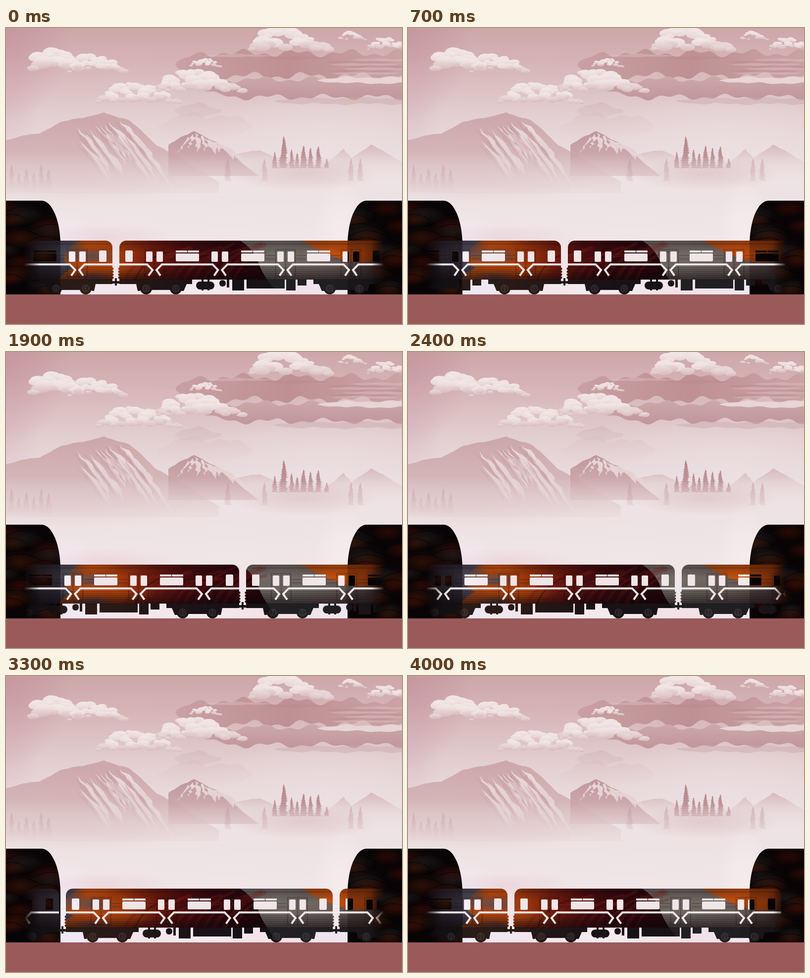
An HTML page with a canvas for the animation above (4.1 s loop, 800x600 px).

```html
<!DOCTYPE html>
<html lang="en">
<head>
<meta charset="utf-8">
<title>Train between tunnels</title>
<style>
  html, body { margin: 0; width: 800px; height: 600px; overflow: hidden; background: #9a5a59; }
  canvas { display: block; }
</style>
</head>
<body>
<canvas id="stage" width="800" height="600"></canvas>
<script>
const W = 800, H = 600, GROUND = 540;
const STEP_MS = 100, STEPS = 41, SPEED = 13.487;
const CAR = 539, PITCH = 553, START = 229, PAD = 20;
const doorAt = i => 71 + i * 132.3;

function layer(w, draw) {
  const cv = document.createElement('canvas');
  cv.width = w;
  cv.height = H;
  const c = cv.getContext('2d');
  if (draw) draw(c);
  return cv;
}

function ramp(c, x0, y0, x1, y1, ...colors) {
  const g = c.createLinearGradient(x0, y0, x1, y1);
  colors.forEach((col, i) => g.addColorStop(i / (colors.length - 1), col));
  return g;
}
const down = (c, y0, y1, ...colors) => ramp(c, 0, y0, 0, y1, ...colors);

function shape(c, paint, d) {
  c.fillStyle = paint;
  c.fill(new Path2D(d));
}

function line(c, paint, width, d) {
  c.strokeStyle = paint;
  c.lineWidth = width;
  c.stroke(new Path2D(d));
}

function oval(c, paint, x, y, rx, ry = rx) {
  c.fillStyle = paint;
  c.beginPath();
  c.ellipse(x, y, rx, ry, 0, 0, 7);
  c.fill();
}

function glow(c, x, y, rx, ry, rgb, alpha) {
  c.save();
  c.translate(x, y);
  c.scale(rx, ry);
  const g = c.createRadialGradient(0, 0, 0, 0, 0, 1);
  [1, .55, 0].forEach((k, i) => g.addColorStop(i / 2, `rgba(${rgb},${alpha * k})`));
  c.fillStyle = g;
  c.fillRect(-1, -1, 2, 2);
  c.restore();
}

function random(seed) {
  return () => (seed = (seed * 16807) % 2147483647) / 2147483647;
}

// Sky

function cumulus(c, x0, x1, base, height) {
  const rnd = random(x0 * 97 + base), w = x1 - x0, lobes = [];
  for (let i = 0, n = w / 4; i < n; i++) {
    const u = (i + rnd()) / n, env = Math.sin(Math.PI * u ** .75);
    const r = height * (.07 + .11 * rnd()) * (.6 + .4 * env);
    lobes.push({ x: x0 + 8 + u * (w - 16), y: base - r - (height - 2 * r) * env * rnd() ** .7, r });
  }
  lobes.sort((a, b) => a.y - b.y).forEach(({ x, y, r }) => {
    const lit = (base - y) / height > .3;
    oval(c, down(c, y - r, y + r * 1.6, lit ? '#f3e8e8' : '#eadbdb', lit ? '#e3cdce' : '#d3b0b2'), x, y, r * 1.9, r);
  });
}

// A long flat cloud with uneven edges and tapered ends.
function bank(c, paint, x0, x1, mid, half) {
  const edge = (x, phase) => {
    const taper = Math.min(1, (x - x0) / 60, (x1 - x) / 60) ** .6;
    return half * taper * (1 + .22 * Math.sin(x / 17 + phase) + .16 * Math.sin(x / 7 + phase * 3));
  };
  const top = [], bottom = [];
  for (let x = x0; x <= x1; x += 3) {
    top.push(`${x} ${mid - edge(x, mid)}`);
    bottom.unshift(`${x} ${mid + edge(x, mid + 2)}`);
  }
  shape(c, paint, `M${top.join(' ')} ${bottom.join(' ')}Z`);
}

function sky(c) {
  c.fillStyle = down(c, 0, 430, '#cda6a8', '#d8b8ba', '#e2ced0', '#eadddf', '#eee3e4', '#f0e5e7');
  c.fillRect(0, 0, W, GROUND);
  glow(c, 0, 30, 130, 160, '182,122,136', .35);
  glow(c, 0, 160, 70, 100, '208,164,182', .3);
  glow(c, 640, 235, 260, 110, '238,226,228', .6);

  const haze = down(c, 150, 225, 'rgba(210,178,180,.5)', 'rgba(222,198,200,0)');
  bank(c, haze, 306, 500, 200, 24);
  bank(c, haze, 340, 436, 168, 17);
  bank(c, ramp(c, 340, 0, 800, 0, '#c9a0a3', '#be9093', '#cba3a5'), 342, 860, 74, 23);
  bank(c, down(c, 98, 146, '#cda8a9', '#c0969a'), 395, 860, 122, 18);
  bank(c, 'rgba(206,174,176,.5)', 540, 860, 148, 6);
  const rnd = random(41);
  for (let i = 0; i < 9; i++) {
    const x = 400 + 300 * rnd();
    bank(c, i % 2 ? 'rgba(178,130,135,.3)' : 'rgba(222,196,196,.4)', x, x + 140, 56 + i * 4.5, 3);
  }
  bank(c, '#e8d5d5', 628, 860, 106, 6);
  [[45, 160, 88, 60], [120, 247, 92, 44], [178, 360, 154, 48], [300, 486, 132, 52], [365, 445, 80, 22],
    [487, 662, 50, 58], [664, 734, 25, 21], [722, 830, 45, 28]].forEach(box => cumulus(c, ...box));
}

// Mountains

// Straight key points broken up by midpoint displacement.
function ridge(c, paint, pts, floor) {
  const rnd = random(pts[0][1] * 53 + floor);
  for (let amount = 6; amount > 1; amount /= 2) {
    pts = pts.flatMap((p, i) => {
      const q = pts[i + 1];
      return q ? [p, [(p[0] + q[0]) / 2, (p[1] + q[1]) / 2 + (rnd() - .5) * amount]] : [p];
    });
  }
  shape(c, paint, `M${pts.join(' ')} V${floor}H${pts[0][0]}Z`);
}

function gully(c, paint, x, y, len, lean, width, rnd) {
  const near = [], far = [];
  for (let i = 0; i <= 8; i++) {
    const px = x + lean * len * i / 8 + (rnd() - .5) * 6, py = y + len * i / 8;
    const w = width * Math.sin(Math.PI * i / 8) * (.5 + rnd());
    near.push(`${px} ${py}`);
    far.unshift(`${px + w} ${py - w * .4}`);
  }
  shape(c, paint, `M${near.join(' ')} ${far.join(' ')}Z`);
}

function tree(c, paint, x, top, bottom, half) {
  const rnd = random(x * 31 + top), rows = Math.round((bottom - top) / 5);
  const left = [], right = [];
  for (let i = 1; i <= rows; i++) {
    const y = top + (bottom - top) * i / rows;
    const w = half * Math.min(1, .2 + 1.1 * i / rows);
    const l = w * (.6 + .6 * rnd()), r = w * (.6 + .6 * rnd());
    left.unshift(`${x - l * .55} ${y} ${x - l} ${y + 1}`);
    right.push(`${x + r} ${y + 1} ${x + r * .55} ${y}`);
  }
  shape(c, paint, `M${x} ${top} L${right.join(' ')} ${left.join(' ')}Z`);
}

function mountains(c) {
  const rnd = random(7);
  ridge(c, down(c, 235, 310, 'rgba(206,172,175,.75)', 'rgba(232,216,218,0)'),
    [[440, 262], [514, 248], [590, 284], [640, 280], [682, 245], [698, 264], [738, 236], [800, 272]], 320);
  ridge(c, down(c, 170, 330, '#cca6a8', 'rgba(216,188,190,.8)'),
    [[0, 227], [68, 214], [112, 190], [198, 171], [250, 188], [304, 238], [352, 262], [430, 312]], 335);

  const snow = down(c, 175, 320, '#ecdcdd', '#e4d1d3', 'rgba(236,224,226,.3)');
  const shade = down(c, 175, 320, 'rgba(190,146,150,.5)', 'rgba(205,170,174,.1)');
  for (let i = 0; i < 16; i++) {
    const x = 142 + i * 8, y = 176 + Math.abs(x - 205) * .4 + 34 * rnd();
    const len = 50 + 60 * rnd();
    gully(c, shade, x - 9, y, len, .72, 7, rnd);
    gully(c, snow, x, y, len, .72, 8, rnd);
  }

  ridge(c, down(c, 208, 300, '#c0969a', 'rgba(206,172,175,.8)'),
    [[328, 237], [380, 209], [440, 240], [510, 300]], 300);
  for (let i = 0; i < 8; i++) {
    const x = 366 + i * 9;
    gully(c, snow, x, 212 + Math.abs(x - 382) * .5, 26 + 18 * rnd(), (i - 2) * .28, 8, rnd);
  }

  // mist over the feet of the slopes
  c.fillStyle = down(c, 255, 350, 'rgba(238,227,229,0)', 'rgba(238,227,229,.5)', '#eee3e4');
  c.fillRect(0, 255, W, 96);
  glow(c, 130, 312, 260, 50, '214,184,190', .3);
  glow(c, 600, 296, 150, 36, '210,176,180', .45);

  const pine = down(c, 220, 300, '#b3868a', '#bd9397', 'rgba(206,174,178,.25)');
  [[561, 219], [543, 250], [577, 245], [588, 253], [601, 238], [615, 242], [631, 239], [648, 264]]
    .forEach(([x, top]) => tree(c, pine, x, top, 284, 5 + (284 - top) / 14));
  const pale = down(c, 262, 335, 'rgba(190,148,154,.5)', 'rgba(200,164,170,.35)', 'rgba(214,186,190,0)');
  for (let x = 11; x < 90; x += 15) tree(c, pale, x, 274 + 26 * rnd(), 334, 9);
  [448, 522, 697, 716].forEach(x => tree(c, pale, x, 264, 310, 8));
}

function tunnels(c) {
  glow(c, 120, 470, 70, 100, '246,240,252', .8);
  glow(c, 190, 425, 150, 28, '228,190,202', .35);
  glow(c, 680, 420, 60, 110, '248,238,240', .7);
  c.fillStyle = ramp(c, 100, 0, 700, 0, '#eceaf6', '#f3e5ea', '#f4eaee', '#f3e1e6', '#eee6f2');
  c.fillRect(100, 508, 600, 32);

  const rnd = random(19), tints = ['74,14,6', '40,36,36', '78,26,6'];
  const mouth = () => {
    c.save();
    c.clip(new Path2D(`M0 350H72A38 91 0 0 1 110 440V${GROUND}H0Z`));
    c.fillStyle = '#080405';
    c.fillRect(0, 340, 120, 200);
    for (let i = 0; i < 15; i++) {
      const x = 100 * rnd(), y = 365 + 12 * i, r = 14 + 10 * rnd();
      glow(c, x, y, r * 2, r, tints[i % 3], .5);
      line(c, 'rgba(0,0,0,.45)', 2, `M${x - r * 2} ${y}q${r * 2} ${-r * 1.4} ${r * 4} 0`);
    }
    c.restore();
  };
  mouth();
  c.save();
  c.translate(W, 0);
  c.scale(-1, 1);
  mouth();
  c.restore();
  c.fillStyle = '#9a5a59';
  c.fillRect(0, GROUND, W, H - GROUND);
}

// Train

// Colours that stay in place while the cars pass through them.
function paintwork(c) {
  c.fillStyle = ramp(c, 40, 0, 760, 0, '#352e38', '#4b4855', '#5a5558', '#635c58', '#69625d', '#716a65', '#6a5c57', '#4c3f3e');
  c.fillRect(0, 420, W, 120);
  shape(c, ramp(c, 100, 0, 550, 0, '#9c4c1c', '#b8480e', '#a23a0c', '#701c0e', '#480c0e', '#32080d', '#28060b', '#1c0508'),
    'M92 540 Q104 500 136 486 Q108 474 122 452 Q134 436 160 428 H468 Q500 446 510 476 Q520 506 552 540Z');
  glow(c, 120, 446, 46, 34, '78,74,88', .9);
  glow(c, 176, 462, 52, 17, '80,76,88', .9);
  glow(c, 176, 505, 46, 12, '72,68,78', .8);
  glow(c, 180, 437, 54, 11, '208,88,18', .8);
  glow(c, 230, 490, 74, 16, '206,84,18', .6);
  const rnd = random(5);
  for (let x = 240; x < 480; x += 20) {
    const rgb = rnd() < .5 ? '128,28,24' : '14,2,5';
    line(c, `rgba(${rgb},.3)`, 3 + 6 * rnd(), `M${x} 512 q20 -50 ${60 + 40 * rnd()} ${-40 - 44 * rnd()}`);
  }
  shape(c, ramp(c, 600, 431, 700, 500, '#a8501c', '#c24f0e', '#a8420c'),
    'M590 428 H770 V464 Q736 478 698 474 Q646 462 590 428Z');
  glow(c, 610, 462, 50, 18, '116,106,100', .6);
  glow(c, 770, 470, 50, 60, '60,16,12', .8);
  c.fillStyle = down(c, 430, 512, 'rgba(10,4,8,.3)', 'rgba(10,4,8,0)', 'rgba(10,4,8,.05)', 'rgba(10,4,8,.6)');
  c.fillRect(0, 430, W, 80);
  c.fillStyle = 'rgba(20,20,24,.86)';
  c.fillRect(0, 510, W, 30);
  [[0, .42], [690, .25]].forEach(([x, a]) => {
    c.fillStyle = `rgba(8,3,5,${a})`;
    c.fillRect(x, 420, 110, 120);
  });
}

const box = (x, y, w, h) => `M${x} ${y}h${w}v${h}h${-w}z`;

function bothEnds(c, draw) {
  draw();
  c.save();
  c.translate(CAR, 0);
  c.scale(-1, 1);
  draw();
  c.restore();
}

function hull(c) {
  c.translate(PAD, 0);
  const pane = (x, y, w, h, r = 2) => {
    c.beginPath();
    c.roundRect(x, y, w, h, r);
    c.fill();
  };
  pane(0, 431, CAR, 79, [14, 14, 0, 0]);
  pane(155, 514, 37, 16, 8);
  pane(202, 511, 13, 13, 6);
  shape(c, '#000', box(166, 510, 4, 22) + box(178, 510, 4, 22) + box(217, 510, 5, 16) +
    box(228, 510, 24, 22) + box(257, 510, 77, 18) + box(337, 510, 19, 22) + box(360, 510, 18, 12));
  bothEnds(c, () => {
    for (let y = 488; y < 510; y += 6) oval(c, '#000', 0, y, 2.5);
    shape(c, '#000', box(0, 510, 147, 9) + box(44, 517, 80, 14) + box(-19, 513, 25, 5) + box(-9, 507, 4, 15) +
      'M34 519h12l-4 14h-5ZM122 519h14l-6 14h-5Z');
    [54, 114].forEach(x => oval(c, '#000', x, 528, 12));
  });

  // windows are see-through
  c.globalCompositeOperation = 'destination-out';
  bothEnds(c, () => pane(12, 451, 15, 23));
  for (let i = 0; i < 4; i++) {
    const x = Math.round(doorAt(i));
    pane(x - 17, 453, 13, 21);
    pane(x + 4, 453, 13, 21);
    if (i === 3) continue;
    pane(x + 43, 451, 23, 4, 1);
    pane(x + 67, 451, 23, 4, 1);
    pane(x + 43, 457, 47, 16);
  }
}

function trim(c) {
  c.translate(PAD, 0);
  const dark = 'rgba(12,6,10,.42)', stripe = '#f1e6e6';
  for (let y = 486; y < 509; y += 4) line(c, dark, 1.2, `M0 ${y}H${CAR}`);
  line(c, dark, 1, 'M4 438H535M0 509.5H539');

  let left = 0;
  for (let i = 0; i < 4; i++) {
    const x = doorAt(i);
    line(c, dark, 1.2, box(x - 20, 449, 40, 55) + `M${x} 449V504`);
    if (i < 3) line(c, dark, 1, `M${x + 22} 461h20m49 0h20M${x + 22} 468h20m49 0h20`);
    line(c, stripe, 4, `M${left} 479.2H${x - 15}L${x - 4} 490.5 ${x - 12} 502M${x + 19} 479.2H${x + 15}L${x + 4} 490.5 ${x + 12} 502`);
    left = x + 18;
  }
  line(c, stripe, 4, `M${left} 479.2H${CAR}`);

  bothEnds(c, () => [54, 114].forEach(x => {
    oval(c, 'rgba(190,170,170,.12)', x, 528, 8);
    line(c, 'rgba(5,3,5,.6)', 1.2, `M${x - 3} 524v8M${x + 3} 524v8`);
  }));
}

const scene = layer(W, c => { sky(c); mountains(c); tunnels(c); });
const paint = layer(W, paintwork);
const carHull = layer(CAR + 2 * PAD, hull);
const carTrim = layer(CAR + 2 * PAD, trim);
const train = layer(W);
const tc = train.getContext('2d');
const edges = tc.createLinearGradient(36, 0, 764, 0);
[[0, 0], [.045, 1], [.965, 1], [1, 0]].forEach(([at, a]) => edges.addColorStop(at, `rgba(0,0,0,${a})`));
const stage = document.getElementById('stage').getContext('2d');

function drawTrain(shift) {
  const cars = sprite => {
    for (let n = 0; n < 3; n++) tc.drawImage(sprite, START + shift - n * PITCH - PAD, 0);
  };
  tc.globalCompositeOperation = 'source-over';
  tc.clearRect(0, 0, W, H);
  cars(carHull);
  tc.globalCompositeOperation = 'source-atop';
  tc.drawImage(paint, 0, 0);
  cars(carTrim);
  tc.globalCompositeOperation = 'destination-in';
  tc.fillStyle = edges;
  tc.fillRect(0, 0, W, H);
}

function frame() {
  const step = Math.floor(performance.now() / STEP_MS) % STEPS;
  drawTrain(Math.round(step * SPEED));
  stage.drawImage(scene, 0, 0);
  stage.drawImage(train, 0, 0);
  requestAnimationFrame(frame);
}
frame();
</script>
</body>
</html>
```
